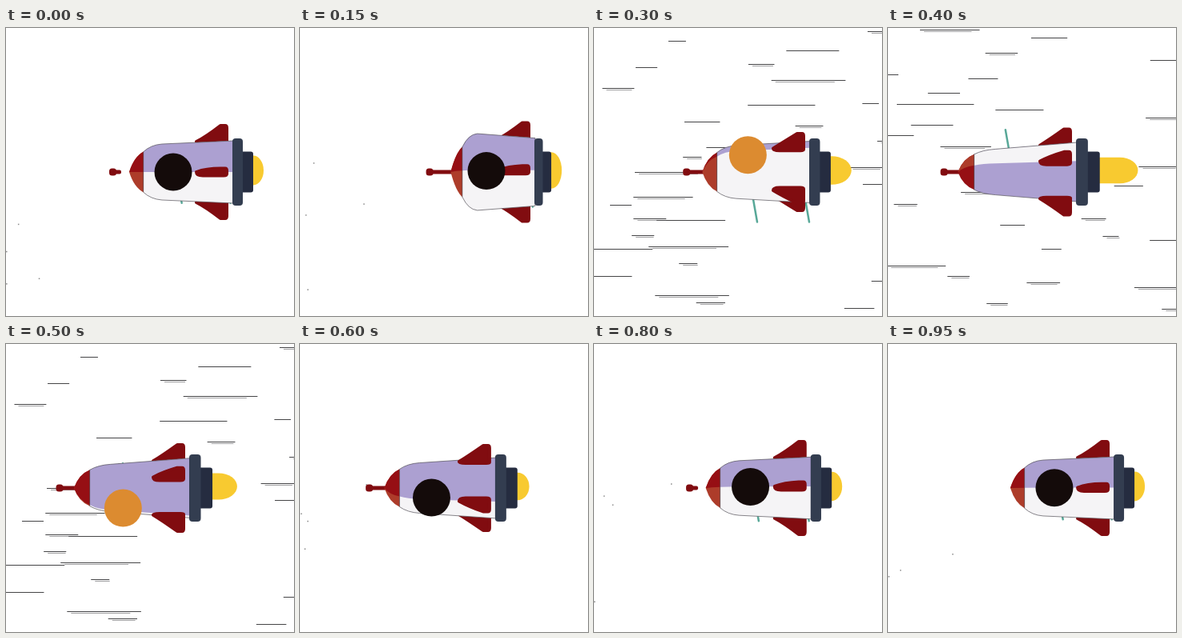
An HTML page with a canvas for the animation above (1 s loop, 360 px wide and 360 px high).

```html
<!DOCTYPE html>
<html lang="en">
<head>
<meta charset="utf-8">
<title>Rolling rocket</title>
<style>
  html, body { margin: 0; width: 100%; height: 100%; overflow: hidden; background: #fff; }
  canvas { display: block; width: 100vw; height: 100vh; }
</style>
</head>
<body>
<canvas id="stage" width="360" height="360"></canvas>
<script>
const ctx = document.getElementById('stage').getContext('2d');
const LOOP = 1000, STEP = 50, SIZE = 360, CY = 180;

const INK = {
  lilac: '#aca0d1', white: '#f5f4f6', red: '#810c10', cone: '#960f14', warm: '#ad3c2a',
  collar: '#333d50', ring: '#252c40', flame: '#f8ca30', teal: '#58a898',
  badge: '#140b0a', glow: '#dc8b30'
};

// Time, rear edge of the hull, hull length, roll in degrees.
const KEYS = [
  [0, 283, 111, 0],
  [150, 293, 90, -3],
  [300, 269, 115, -52],
  [400, 235, 127, -202],
  [500, 229, 124, -292],
  [700, 260, 115, -356],
  [1000, 283, 111, -360]
];

const cosd = d => Math.cos(d * Math.PI / 180);
const sind = d => Math.sin(d * Math.PI / 180);
const mod = (n, m) => ((n % m) + m) % m;

function seeded(seed) {
  let s = seed * 7919 + 17;
  return () => (s = s * 16807 % 2147483647) / 2147483647;
}

// Smooth curve through the key points of one column.
function curve(t, col) {
  let i = 0;
  while (i < KEYS.length - 2 && KEYS[i + 1][0] < t) i++;
  const slope = n => {
    const a = KEYS[n - 1], b = KEYS[n + 1];
    return a && b ? (b[col] - a[col]) / (b[0] - a[0]) : 0;
  };
  const a = KEYS[i], b = KEYS[i + 1], h = b[0] - a[0];
  const u = (t - a[0]) / h, v = 1 - u;
  return v * v * (1 + 2 * u) * a[col] + u * u * (1 + 2 * v) * b[col]
    + h * u * v * (v * slope(i) - u * slope(i + 1));
}

// A longer hull is thinner.
function poseAt(t) {
  const rear = curve(t, 1), length = curve(t, 2), roll = curve(t, 3);
  const s = length / 111, cone = rear - length;
  return {
    rear, roll, s, cone,
    tip: cone - 18 * s,
    coneH: 25.5 / s,
    shoulderH: 35 / s ** 1.5,
    rearH: 39 / s ** 0.4,
    collarW: 13 * s,
    flameH: 18.5 / s,
    flameW: 13 + 35 * Math.exp(-(((t - 410) / 110) ** 2))
  };
}

function block(x, y, w, h, r, color) {
  ctx.fillStyle = color;
  ctx.beginPath();
  ctx.roundRect(x, y, w, h, r);
  ctx.fill();
}

function drawStreaks(t) {
  const rand = seeded(3 + t % 200);
  for (let i = 0; i < 30; i++) {
    const y = Math.floor((i + rand()) * 12);
    const x = rand() * 390 - 30, w = 20 + 80 * rand() ** 1.4;
    ctx.fillStyle = '#454547';
    ctx.fillRect(x, y, w, 1);
    if (rand() < 0.5) continue;
    ctx.fillStyle = '#a0a0a2';
    ctx.fillRect(x + 5, y + 2, w * 0.8, 1);
  }
}

function drawSpecks(t) {
  const rand = seeded(t + 1);
  ctx.fillStyle = '#8a8a8a';
  for (let i = 0; i < 4; i++) {
    ctx.fillRect(SIZE * rand() ** 3, 160 + 180 * rand(), 1.5, 1.5);
  }
}

// Two thin legs that turn with the hull, on its far side at rest.
function drawLegs(p) {
  const c = cosd(232 + p.roll);
  ctx.strokeStyle = INK.teal;
  ctx.lineWidth = 2.5;
  ctx.lineCap = 'round';
  for (const x of [p.cone + 44, p.rear - 6]) {
    ctx.beginPath();
    ctx.moveTo(x, CY - (p.rearH - 10) * c);
    ctx.lineTo(x - 6 * c, CY - (p.rearH + 24) * c);
    ctx.stroke();
  }
}

// A fin at an angle around the hull: 0 is up, 90 faces the viewer.
function drawFin(p, angle) {
  const c = cosd(angle), side = c < 0 ? -1 : 1;
  const thick = 4.5 * Math.abs(sind(angle)) * side;
  const root = CY - (p.rearH - 1) * c;
  const outer = CY - (p.rearH + 19) * c - thick, inner = root + thick;
  const front = p.rear - 45, back = p.rear - 7;
  ctx.fillStyle = ctx.strokeStyle = INK.red;
  ctx.lineWidth = 4;
  ctx.lineJoin = 'round';
  ctx.beginPath();
  ctx.moveTo(front, root);
  ctx.quadraticCurveTo(front + 12, root - thick - 6 * c, back - 8, outer);
  ctx.lineTo(back - 2, outer);
  ctx.quadraticCurveTo(back, outer, back, outer + 3 * side);
  ctx.lineTo(back, inner - thick * 0.5);
  ctx.quadraticCurveTo(back, inner, back - 4, inner);
  ctx.lineTo(front + 8, inner);
  ctx.quadraticCurveTo(front, inner, front, root);
  ctx.fill();
  ctx.stroke();
}

function drawFins(p, near) {
  for (let i = 0; i < 4; i++) {
    const angle = i * 90 + p.roll;
    if ((sind(angle) > 0.1) === near) drawFin(p, angle);
  }
}

// Both paths fill the part between two heights, 1 being the top and -1 the bottom.
function hullPath(p, top, low) {
  const y = (h, k) => CY - h * k, bend = p.cone + 9 * p.s, shoulder = p.cone + 23 * p.s;
  ctx.beginPath();
  ctx.moveTo(p.cone, y(p.coneH, top));
  ctx.quadraticCurveTo(bend, y(p.shoulderH - 1, top), shoulder, y(p.shoulderH, top));
  ctx.lineTo(p.rear + 1, y(p.rearH, top));
  ctx.lineTo(p.rear + 1, y(p.rearH, low));
  ctx.lineTo(shoulder, y(p.shoulderH, low));
  ctx.quadraticCurveTo(bend, y(p.shoulderH - 1, low), p.cone, y(p.coneH, low));
  ctx.closePath();
}

function conePath(p, top, low) {
  const mid = p.tip + 6;
  ctx.beginPath();
  ctx.moveTo(p.tip, CY);
  ctx.quadraticCurveTo(mid, CY - p.coneH * 0.75 * top, p.cone, CY - p.coneH * top);
  ctx.lineTo(p.cone, CY - p.coneH * low);
  ctx.quadraticCurveTo(mid, CY - p.coneH * 0.75 * low, p.tip, CY);
}

function fillHalves(path, p, upper, lower, seam) {
  ctx.fillStyle = lower;
  path(p, 1, -1);
  ctx.fill();
  ctx.fillStyle = upper;
  path(p, 1, seam);
  ctx.fill();
}

// One half of the hull is lilac, so the seam moves as it rolls.
function drawHull(p) {
  const edge = mod(90 + p.roll, 360), lilacUp = edge <= 180;
  const seam = cosd(edge % 180);
  const order = (a, b) => lilacUp ? [a, b] : [b, a];
  fillHalves(conePath, p, ...order(INK.cone, INK.warm), seam);
  fillHalves(hullPath, p, ...order(INK.lilac, INK.white), seam);
  hullPath(p, 1, -1);
  ctx.strokeStyle = '#55525a';
  ctx.lineWidth = 0.7;
  ctx.stroke();
}

function drawAntenna(p, t) {
  if (t >= 850) return;
  const x = p.tip - 25 / p.s, joined = t > 0 && t < 650;
  const end = joined ? p.tip + 4 : x + 15;
  block(x, CY - 4.5, 9, 9, 3.5, INK.red);
  block(x + 5, CY - 2.5, end - x - 5, 5, 2, INK.red);
}

function drawEngine(p) {
  const w = p.collarW, base = p.rear + w * 2, end = base + p.flameW;
  const rx = Math.min(p.flameW, p.flameH * 1.4), y = CY - 2, half = p.flameH;
  ctx.fillStyle = INK.flame;
  ctx.beginPath();
  ctx.moveTo(base - 2, y - half);
  ctx.lineTo(end - rx, y - half);
  ctx.ellipse(end - rx, y, rx, half, 0, -Math.PI / 2, Math.PI / 2);
  ctx.lineTo(base - 2, y + half);
  ctx.fill();
  block(p.rear + w - 3, CY - 25.5, w + 3, 51, 3, INK.ring);
  block(p.rear, CY - 42, w, 84, 4, INK.collar);
}

function drawBadge(p) {
  const angle = 90 + p.roll, c = cosd(angle);
  if (sind(angle) < 0.3) return;
  ctx.fillStyle = Math.abs(c) > 0.5 ? INK.glow : INK.badge;
  ctx.beginPath();
  ctx.arc(p.cone + 37 * p.s, CY - 27 * c, 23.5, 0, 7);
  ctx.fill();
}

function draw(t) {
  const p = poseAt(t), rush = t > 200 && t < 600;
  ctx.fillStyle = '#fff';
  ctx.fillRect(0, 0, SIZE, SIZE);
  (rush ? drawStreaks : drawSpecks)(t);
  drawLegs(p);
  drawFins(p, false);
  drawAntenna(p, t);
  drawHull(p);
  drawFins(p, true);
  drawEngine(p);
  drawBadge(p);
}

function tick() {
  const t = performance.now() % LOOP;
  draw(Math.floor(t / STEP) * STEP);
  requestAnimationFrame(tick);
}
draw(0);
requestAnimationFrame(tick);
</script>
</body>
</html>
```
